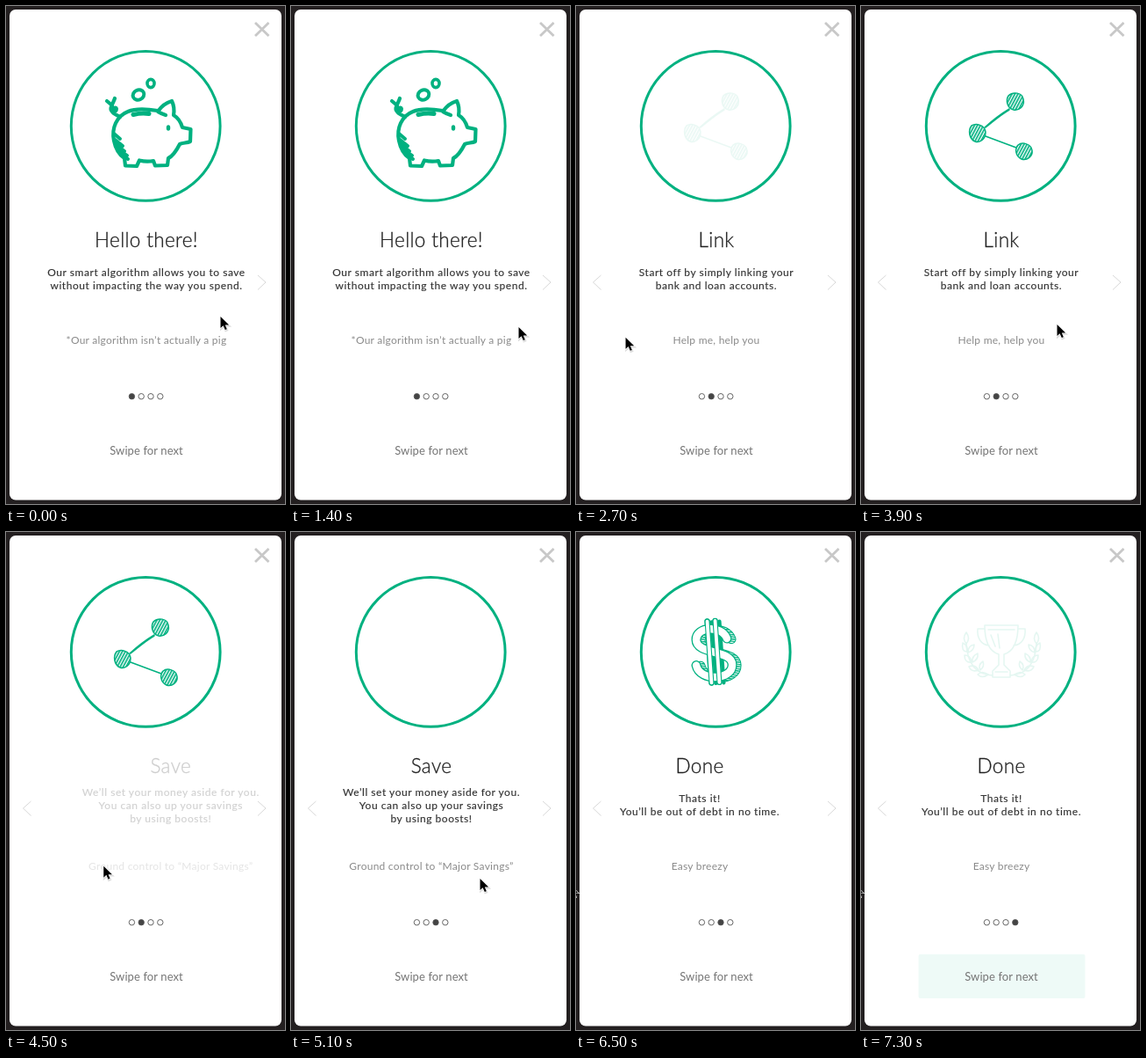
Animation, 318 px wide and 566 px high, one loop 7400 ms. Source, as an HTML page:

```html
<!DOCTYPE html>
<html lang="en">
<head>
<meta charset="utf-8">
<title>Onboarding cards</title>
<style>
  html, body { margin: 0; width: 100%; height: 100%; overflow: hidden; background: #231f20; }
  svg { display: block; width: 100vw; height: 100vh; }
  text { font-family: Lato, sans-serif; text-anchor: middle; }
  .title { font-size: 22.5px; font-weight: 300; letter-spacing: .35px; fill: #222; stroke: #222; stroke-width: .3px; }
  .body { font-size: 12px; font-weight: 400; letter-spacing: .54px; fill: #333; stroke: #333; stroke-width: .15px; }
  .note { font-size: 12px; font-weight: 400; letter-spacing: .25px; fill: #8a8a8a; }
  .swipe { font-size: 13px; font-weight: 400; letter-spacing: .1px; fill: #757575; }
  .ink { fill: none; stroke: #00b180; stroke-linecap: round; stroke-linejoin: round; }
  .arrow { fill: none; stroke: #d8d8d8; }
  .icon { opacity: 0; }
</style>
</head>
<body>
<svg viewBox="0 0 318 566">
  <defs>
    <pattern id="hatch" width="3" height="3" patternUnits="userSpaceOnUse" patternTransform="rotate(28)">
      <rect width="3" height="3" fill="#fff"/>
      <rect width="1.7" height="3" fill="#00b180"/>
    </pattern>
    <pattern id="rungs" width="3" height="2.5" patternUnits="userSpaceOnUse" patternTransform="rotate(12)">
      <rect width="3" height="2.5" fill="#fff"/>
      <rect width="3" height="1.4" fill="#00b180"/>
    </pattern>
    <path id="ess" d="M173 122C168 106 139 106 138 121C137 138 178 135 177 152C176 170 139 169 136 150"/>
    <path id="bars" d="M152 101V171M161 101V171"/>
    <g id="laurel">
      <path d="M150 163C132 162 121 150 120 126"/>
      <path d="M120 127q-5 -6 0 -13q5 7 0 13M121 136q-7 0 -5 -10q6 3 5 10M122 137q7 -2 7 -9q-7 1 -7 9M126 148q-8 1 -8 -8q7 0 8 8M127 148q7 -3 6 -10q-7 3 -6 10M134 157q-8 3 -11 -4q7 -3 11 4M136 157q5 -4 3 -10q-6 4 -3 10M145 162q-7 5 -12 0q5 -5 12 0"/>
    </g>
  </defs>

  <rect width="318" height="566" fill="#231f20"/>
  <rect x="4" y="4" width="310" height="557.600" rx="7" fill="#fff"/>
  <path d="M284 19L299.500 34M299.500 19L284 34" stroke="#c8c8c8" stroke-width="2.800"/>
  <circle class="ink" cx="159.200" cy="136.400" r="84.900" stroke-width="3"/>

  <g class="icon ink" stroke-width="4.200">
    <path d="M173 119C161 117 148 116 139 120C126 125 120 139 123 153C125 163 129 169 135 173L136 181.500L149 182L152 175.500C158 177 163 177 168 176L170 181.500L184 181L185 173C191 170 195 163 198 157C202 155 206 156 210 154L210.500 140L201 138C199 131 196 127 191 124C192 118 191 112 189 108C182 110 177 114 173 120C176 122 179 123 182 124"/>
    <path d="M145 123.500C151 122 157 121.500 163 122.500" stroke-width="5"/>
    <ellipse cx="185" cy="138.500" rx="1" ry="2" stroke-width="2.500"/>
    <path d="M123 145L130 151M123 151L133 159M125 157L135 165M127 163L138 170M131 169L139 174" stroke-width="4"/>
    <path d="M130 126C124 122 118 122 123 116C128 114 126 122 121 120C117 117 122 111 124 105M121 113L115 108" stroke-width="4.200"/>
    <ellipse cx="151" cy="101" rx="6.500" ry="5.500" transform="rotate(-25 151 101)" stroke-width="4"/>
    <ellipse cx="165" cy="88" rx="4" ry="4.600" stroke-width="3.600"/>
  </g>

  <g class="icon ink" stroke-width="1.500">
    <path d="M141 138C150 130 159 123 169 117M142 138C150 132 157 125 169 118M142 148L177 161"/>
    <g fill="url(#hatch)">
      <path d="M168 102C173 97 184 98 185 106C187 114 180 119 174 118C166 116 165 107 168 102Z"/>
      <path d="M126 136C131 133 141 135 142 143C142 151 136 156 130 154C123 151 122 141 126 136Z"/>
      <path d="M179 158C184 154 194 157 195 164C196 171 189 176 183 174C176 171 175 162 179 158Z"/>
    </g>
  </g>

  <g class="icon ink" transform="rotate(-4 159 136)">
    <g transform="translate(5 1)">
      <use href="#ess" stroke-width="11"/>
      <use href="#ess" stroke="url(#rungs)" stroke-width="9"/>
      <use href="#bars" stroke-width="4"/>
    </g>
    <use href="#ess" stroke-width="11"/>
    <use href="#bars" stroke-width="6.500"/>
    <use href="#ess" stroke="#fff" stroke-width="8.400"/>
    <use href="#bars" stroke-width="6"/>
    <use href="#bars" stroke="#fff" stroke-width="3.800"/>
  </g>

  <g class="icon ink" stroke-width="1.600">
    <rect x="65.500" y="480" width="190" height="50" rx="2" fill="#00b180" fill-opacity=".65" stroke="none"/>
    <use href="#laurel"/>
    <use href="#laurel" transform="matrix(-1 0 0 1 320 0)"/>
    <path d="M141 106H179C179 125 173 136 163 139V151L170 158V165H150V158L157 151V139C147 136 141 125 141 106ZM141 110H133C132 121 137 128 146 129M179 110H187C188 121 183 128 174 129M145 111H175M153 159H167M148 117L153 130M156 116L158 132"/>
  </g>

  <path id="back" class="arrow" d="M28.500 306L19.500 314L28.500 322.500"/>
  <path id="next" class="arrow" d="M287 306L296 314L287 322.500"/>
  <g id="copy"></g>
  <g id="dots" stroke="#555" stroke-width=".9"></g>
  <text class="swipe" x="160" y="510">Swipe for next</text>
  <g id="cursor">
    <path d="M0 0V13L3.100 10.200L5.300 15L7.300 14.200L5.300 9.500H9.700Z" transform="translate(.5 1.300)" stroke="#000" stroke-width="2" opacity=".13"/>
    <path d="M0 0V13L3.100 10.200L5.300 15L7.300 14.200L5.300 9.500H9.700Z" stroke="#fff" stroke-width="1.200" paint-order="stroke"/>
  </g>
</svg>
<script>
const LOOP = 7400, FRAME = 100;
const FADE_OUT = 350, ICON_DELAY = 700, FADE_IN = 500;

const slides = [
  { title: "Hello there!", note: "*Our algorithm isn’t actually a pig",
    body: ["Our smart algorithm allows you to save", "without impacting the way you spend."] },
  { title: "Link", note: "Help me, help you",
    body: ["Start off by simply linking your", "bank and loan accounts."] },
  { title: "Save", note: "Ground control to “Major Savings”",
    body: ["We’ll set your money aside for you.", "You can also up your savings", "by using boosts!"] },
  { title: "Done", note: "Easy breezy",
    body: ["Thats it!", "You’ll be out of debt in no time."] }
];

// The copy swaps halfway through a drag; dots, arrows and icon follow on release.
const swaps = [1800, 4450, 5700];
const releases = [1960, 4650, 6550];

// Keys are [time, ...values]; a repeated time makes a jump.
const copyKeys = [
  [0, 0], [1650, 0], [1800, -30], [1800, 30], [2050, 0],
  [4250, 0], [4450, -30], [4450, 30], [4750, 0],
  [5400, 0], [5700, -30], [5700, 30], [6100, -15], [6400, -19], [6550, -19], [6850, 0], [LOOP, 0]
];
const cursorKeys = [
  [0, 244.5, 353], [700, 262, 356], [1400, 259.5, 365], [1650, 257, 371], [2000, 65.5, 375], [2100, 65.5, 375],
  [2600, 56, 377], [3300, 66, 373], [3900, 223.5, 362], [4250, 222, 366], [4650, 60, 386],
  [4850, 40, 396], [5100, 215.5, 394], [5400, 215, 396], [6100, -7, 401], [LOOP, -7, 401]
];

const $ = id => document.getElementById(id);
const icons = document.querySelectorAll(".icon");
const clamp = v => Math.max(0, Math.min(1, v));
const countPassed = (times, t) => times.filter(time => t >= time).length;
const show = (el, on) => el.setAttribute("visibility", on ? "visible" : "hidden");

function sample(keys, t) {
  let i = keys.length - 2;
  while (keys[i][0] > t) i--;
  const [from, to] = [keys[i], keys[i + 1]];
  const p = clamp((t - from[0]) / (to[0] - from[0]));
  const eased = p * p * (3 - 2 * p);
  return from.slice(1).map((v, k) => v + (to[k + 1] - v) * eased);
}

function copyMarkup({ title, body, note }) {
  const line = (kind, y, text) => `<text class="${kind}" x="160" y="${y}">${text}</text>`;
  const top = 322 - body.length * 7.5;
  return line("title", 273.5, title)
    + body.map((text, i) => line("body", top + i * 15, text)).join("")
    + line("note", 384, note);
}

function iconOpacity(i, t) {
  const fadeIn = i ? clamp((t - releases[i - 1] - ICON_DELAY) / FADE_IN) : 1;
  const fadeOut = i < releases.length ? 1 - clamp((t - releases[i]) / FADE_OUT) : 1;
  return Math.min(fadeIn, fadeOut);
}

$("dots").innerHTML = slides.map((_, i) =>
  `<circle cx="${143.4 + i * 10.8}" cy="443.700" r="3.200"/>`).join("");

let shownCopy = -1;
function draw(t) {
  const copyIndex = countPassed(swaps, t);
  const page = countPassed(releases, t);

  if (copyIndex !== shownCopy) {
    $("copy").innerHTML = copyMarkup(slides[copyIndex]);
    shownCopy = copyIndex;
  }
  const [shift] = sample(copyKeys, t);
  $("copy").setAttribute("transform", `translate(${shift} 0)`);
  $("copy").style.opacity = clamp((30 - Math.abs(shift)) / 10);

  icons.forEach((icon, i) => icon.style.opacity = iconOpacity(i, t));
  [...$("dots").children].forEach((dot, i) => dot.setAttribute("fill", i === page ? "#444" : "#fff"));
  show($("back"), page > 0);
  show($("next"), page < slides.length - 1);
  $("cursor").setAttribute("transform", `translate(${sample(cursorKeys, t).join(" ")})`);
}

const start = performance.now();
function tick() {
  const elapsed = (performance.now() - start) % LOOP;
  draw(Math.floor(elapsed / FRAME) * FRAME);
  requestAnimationFrame(tick);
}
tick();
</script>
</body>
</html>
```
